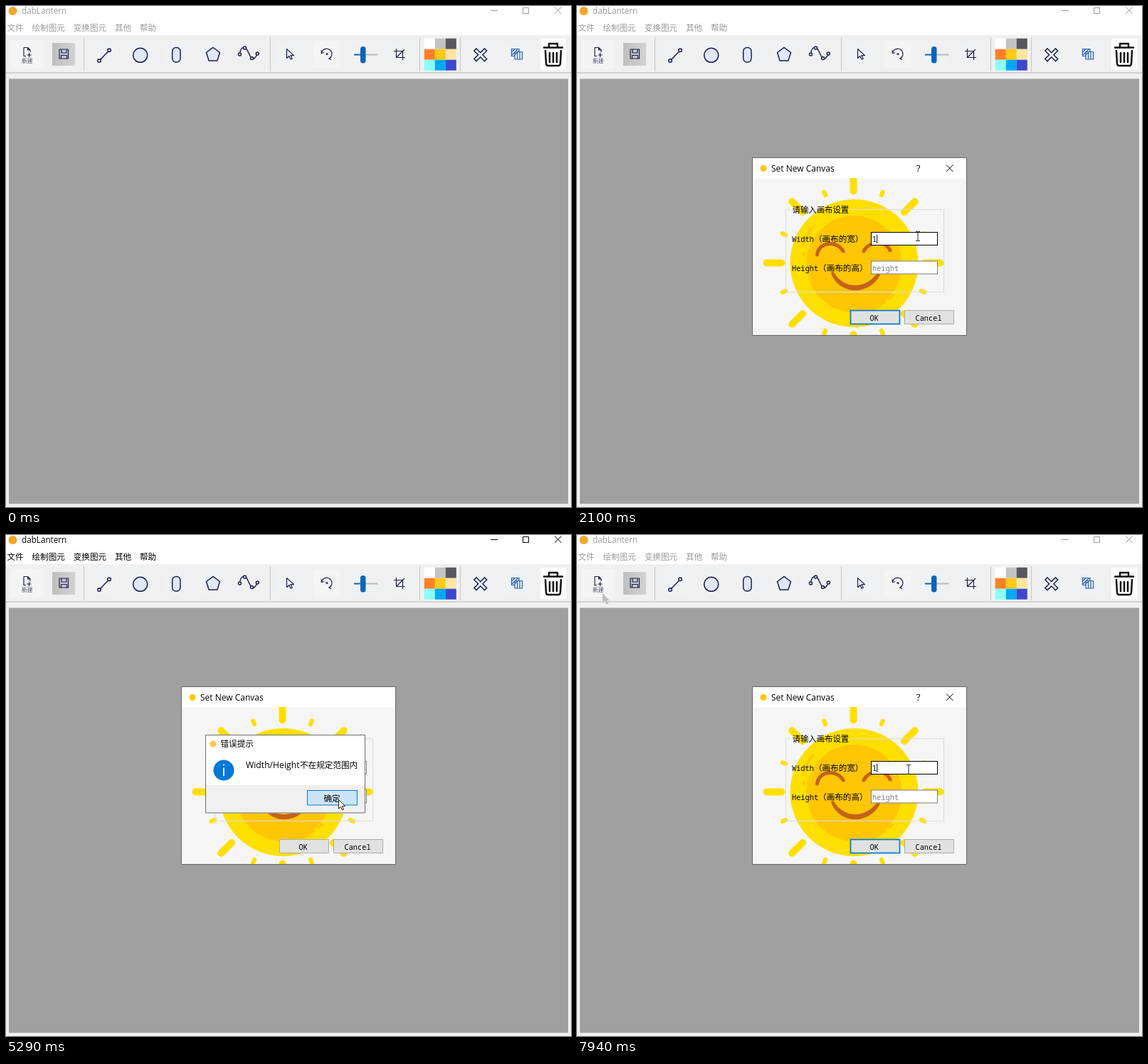
These frames come from a looping animation (794x705 px, 8 s). An HTML page:

```html
<!DOCTYPE html>
<html lang="zh">
<head>
<meta charset="utf-8">
<title>dabLantern</title>
<style>
html, body { margin: 0; width: 100%; height: 100%; overflow: hidden; background: #f0f0f0; }
svg { display: block; }
text { font: 11.7px 'Open Sans', 'Noto Sans CJK SC', 'Noto Sans CJK JP', sans-serif; white-space: pre; }
.mono { font: 10.3px 'Noto Sans Mono', 'Noto Sans CJK SC', 'Noto Sans CJK JP', monospace; }
.cjk { font: 11.6px 'Noto Sans CJK SC', 'Noto Sans CJK JP', sans-serif; }
.icon { fill: none; stroke: #1d1f52; stroke-width: 1.5; stroke-linejoin: round; }
.thin { stroke-width: 1.2; }
.pale { fill: #e1e8fb; }
.line { fill: none; stroke: currentColor; }
.fill { fill: currentColor; }
.round { fill: none; stroke-linecap: round; stroke-linejoin: round; }
</style>
</head>
<body>
<svg width="794" height="705" viewBox="0 0 794 705">
  <defs>
    <linearGradient id="steel"><stop stop-color="#bfbfbf"/><stop offset="1" stop-color="#d2d2d2"/></linearGradient>
    <clipPath id="inside"><path d="M247 242h300v221h-300z"/></clipPath>
  </defs>

  <!-- main window -->
  <path fill="#fff" d="M0 0h794v41H0z"/>
  <path fill="#a0a0a0" d="M4 102.5h786v598H4z"/>
  <path class="line" color="#b4b4b4" d="M0 94h794"/>
  <path class="line" color="#c6c6c6" d="M109.5 44v48M371.5 44v48M581.5 44v48M638.5 44v48"/>
  <circle cx="9.5" cy="7" r="6" fill="#f3a52c"/>
  <g id="chrome">
    <text class="fill" x="22" y="11">dabLantern</text>
    <g class="fill" id="menu"></g>
    <path class="line" d="M681 6.500h10M726.500 2.500h8v8h-8zM771 1.500l9.500 9.500M780.500 1.500l-9.500 9.500"/>
  </g>

  <!-- toolbar -->
  <g id="tiles" fill="#eff1f3"></g>
  <path fill="#f4f4f4" d="M7 48h46v40H7zM432 49h38v38h-38z"/>
  <path fill="url(#steel)" d="M65 52h32v32H65z"/>
  <path fill="#fff" d="M751 46h36v44h-36z"/>
  <g class="icon">
    <path class="thin" d="M28 70.500h-3v-12h5.500l3.500 3.500v3M30.500 58.500v3.500h3.500M32.500 66v6M29.500 69h6"/>
    <path class="thin" d="M75 61h12.500v13H75zM78 61v5h7v-5M77.500 74v-4.500h8V74"/>
    <path d="M132.500 75.500l11-11.500"/>
    <circle class="pale" cx="131" cy="77" r="2.300"/><circle class="pale" cx="145" cy="62.300" r="2.300"/>
    <circle class="pale" cx="188.700" cy="69.300" r="10"/>
    <rect class="pale" x="233.700" y="58.500" width="11.300" height="20.500" rx="5"/>
    <path class="pale" d="M291 58.300l9.500 7.200-3.600 11.500h-11.800l-3.600-11.500z"/>
    <path d="M328.500 67C330 57 336 55 340 64S347 80 353 68"/>
    <circle class="pale" cx="328.500" cy="68" r="2"/><circle class="pale" cx="335.500" cy="59" r="2"/>
    <circle class="pale" cx="345.500" cy="73.500" r="2"/><circle class="pale" cx="353.300" cy="67" r="2"/>
    <path class="thin" d="M394.500 60.500v13l3.300-3 2.400 4.700 2-1-2.300-4.600h4.600z"/>
    <path class="thin" d="M443.500 66a7.300 7.300 0 1 1 10.500 8M443 62.500l.5 4 3.700-1M456.500 71.500l-2.700 2.600 3.300 1.400"/>
    <circle class="thin" cx="451" cy="67.500" r="1"/>
    <path class="thin" d="M548.500 60v12.500H561M545 63.500h12.500V76M548.500 72.500L560 61"/>
  </g>
  <text x="22" y="80" fill="#44466c" style="font-size:7.700px">新建</text>
  <path stroke="#b8b8b8" stroke-width="2" d="M505 68.500h17.500"/>
  <path stroke="#0a65b7" stroke-width="2" d="M489 68.500h10"/>
  <rect x="498" y="57" width="7.500" height="23.500" rx="3.500" fill="#0a65b7"/>
  <g id="palette"></g>
  <g fill="none" stroke-linecap="square">
    <path stroke="#1d1f52" stroke-width="6" d="M661 63l11.500 11.500M672.500 63L661 74.500"/>
    <path stroke="#eef2fc" stroke-width="3" d="M661 63l11.500 11.500M672.500 63L661 74.500"/>
  </g>
  <path class="line thin" color="#2460b4" d="M715 70.500h-4.500v-10h10.500v4M710.500 65l4.500-4.500M710.500 69.500l9-9M714 69.500l6.500-6M715 64.500h10.500V75H715zM718.500 64.500V75M722 64.500V75"/>
  <path class="round" stroke="#111" stroke-width="2.500" d="M756 58.500h26M763 58v-5h12v5M758 63l1 18q.2 3 3 3h14q2.800 0 3-3l1-18M764 66v13M769 66v13M774 66v13"/>

  <!-- canvas size dialog -->
  <g id="dialog">
    <path fill="#f5f5f5" d="M247 214h300v250H247z"/>
    <path fill="#fff" d="M247 214h300v28.500H247z"/>
    <circle cx="262" cy="228.500" r="4.500" fill="#ffc605"/>
    <text id="caption" x="273" y="232.500" style="font-size:12px">Set New Canvas</text>
    <g id="buttons">
      <text class="fill" x="477" y="232.500" style="font-size:12.500px">?</text>
      <path class="line" d="M519 223.500l9.500 9.500M528.500 223.500l-9.500 9.500"/>
    </g>
    <g clip-path="url(#inside)">
      <g id="rays" class="round" stroke="#ffdf00" transform="translate(388.500 361.500)"></g>
      <circle cx="389.500" cy="362" r="90" fill="#ffdf00"/>
      <ellipse cx="389.500" cy="363" rx="67" ry="68" fill="#ffc605"/>
      <path class="round" stroke="#ffc605" stroke-width="3" d="M318 338q4-16 14-29M319 347l-1 4M415 427q10-4 18-11M439 412l5-5"/>
      <path class="round" stroke="#c4621a" stroke-width="5" d="M337.500 350c2-18 27-21 36.500-5M403 345c8-15 31-15 37-1"/>
      <path fill="#c4621a" d="M357 376q1-4 4-1c14 24 44 24 61 1 3-3 5-1 4 2-15 30-57 30-69-2z"/>
    </g>
    <path class="line" color="#dcdcdc" d="M300 286.500h-6.500v116h222v-116H385"/>
    <text class="cjk" x="302.500" y="290.500" style="font-size:11.400px">请输入画布设置</text>
    <g id="fields"></g>
    <path id="caret" stroke="#000" d="M0 0v12"/>
    <rect id="ok" x="384.500" y="428.500" width="69" height="19" fill="#e1e1e1"/>
    <text class="mono" x="411.500" y="442.500">OK</text>
    <rect x="460.500" y="428.500" width="69" height="19" fill="#e1e1e1" stroke="#adadad"/>
    <text class="mono" x="475.500" y="442.500">Cancel</text>
    <path class="line" color="#666" d="M246.500 213.500h301v250h-301z"/>
  </g>

  <!-- error message -->
  <g id="message">
    <path fill="#fff" d="M280.500 281.500h224v110h-224z"/>
    <path fill="#f0f0f0" d="M281 352h223v39H281z"/>
    <path class="line" color="#6c6c6c" d="M280.500 281.500h224v109.500h-224z"/>
    <circle cx="291" cy="294" r="4.500" fill="#ffc84a"/>
    <text class="cjk" x="301.500" y="298">错误提示</text>
    <path id="closeMark" class="line" d="M484 289.500l9 9M493 289.500l-9 9"/>
    <circle cx="306" cy="331" r="14.500" fill="#0078d7"/>
    <path stroke="#fff" stroke-width="1.700" d="M306 327.500V339M306 322.500v2"/>
    <text x="337" y="328" style="font-size:12.200px">Width/Height</text>
    <text class="cjk" x="413" y="328">不在规定范围内</text>
    <path fill="#cce4f7" stroke="#0078d7" d="M423.500 359.500h70v20.500h-70z"/>
    <text class="cjk" x="446.500" y="374.500">确定</text>
  </g>

  <path id="trace" transform="translate(36 82)" fill="#bebebe" d="M0 0v13l3-2.500 2 4.500h3l-2-5h3.500z"/>
  <path id="arrow" fill="#fff" stroke="#222" d="M.5.5V13l3-2.700 2 4.700 2-.9-2-4.600h4z"/>
  <path id="beam" fill="none" stroke="#222" d="M-3-6.500h2q1 0 1 1v11q0 1-1 1h-2M3-6.500H1q-1 0-1 1M3 6.500H1q-1 0-1-1"/>
</svg>
<script>
const $ = id => document.getElementById(id);
const fill = (id, items, part) => { $(id).innerHTML = items.map(part).join(''); };
const set = (id, attrs) => { for (const k in attrs) $(id).setAttribute(k, attrs[k]); };
const show = (id, on) => set(id, { visibility: on ? 'inherit' : 'hidden' });
const ramp = (t, a, b) => Math.min(1, Math.max(0, (t - a) / (b - a)));
const within = (t, a, b) => t >= a && t < b;
const range = n => [...Array(n).keys()];

// menu entries follow each other with an even gap
let menuX = 1.5;
fill('menu', ['文件', '绘制图元', '变换图元', '其他', '帮助'], s => {
  const x = menuX;
  menuX += s.length * 11.6 + 11.8;
  return `<text class="cjk" x="${x}" y="35">${s}</text>`;
});
fill('tiles', [138, 399, 667], x => range(x < 600 ? 4 : 2)
  .map(i => `<rect x="${x - 19 + i * 51.3}" y="50" width="38" height="36"/>`).join(''));
fill('palette', ['fff', 'c3c3c3', '57585c', 'ff7f27', 'ffca18', 'fde6a2', '8cfffb', '00a8f3', '3f48cc'], (c, i) =>
  `<rect x="${587.8 + i % 3 * 15}" y="${45.7 + (i / 3 | 0) * 15}" width="15" height="15" fill="#${c}"/>`);
// sixteen rays, long and short by turns
fill('rays', range(16), i => i % 2
  ? `<path d="M103 0h5" stroke-width="6" transform="rotate(${i * 22.5})"/>`
  : `<path d="M101 0h21" stroke-width="10" transform="rotate(${i * 22.5})"/>`);
fill('fields', [['Width', '宽'], ['Height', '高']], ([name, sign], i) => `<g transform="translate(0 ${i * 40.5})">
  <text class="mono" x="302" y="332">${name}<tspan class="cjk">（画布的${sign}）</tspan></text>
  <rect id="frame${name}" x="413.5" y="318.5" width="93" height="18" fill="#fff"/>
  <text class="mono" id="value${name}" x="415" y="332"></text></g>`);

const spots = {
  entry: [740, 685], create: [36, 82], dialog: [494, 333], width: [479, 324], height: [469, 372],
  ok: [420, 437], confirm: [467, 372], below: [500, 476], widthAgain: [466, 330]
};
// pointer moves: begin, end, goal
const moves = [
  [70, 860, 'create'], [1000, 1150, 'dialog'], [1240, 1790, 'width'], [3260, 3730, 'height'], [4520, 4660, 'ok'],
  [4740, 4920, 'confirm'], [5320, 5520, 'create'], [6180, 6560, 'below'], [6600, 7320, 'widthAgain']
];

function pointer(t) {
  return moves.reduce((from, [a, b, goal]) => {
    const f = ramp(t, a, b), ease = f * f * (3 - 2 * f);
    return from.map((v, i) => v + (spots[goal][i] - v) * ease);
  }, spots.entry);
}

// windows fade while growing slightly around their centre
function fade(id, amount, cx, cy) {
  const s = .95 + .05 * amount;
  set(id, { opacity: amount, transform: `translate(${cx} ${cy}) scale(${s}) translate(${-cx} ${-cy})` });
}

const typed = (text, t, start, gap) => text.slice(0, Math.max(0, Math.floor((t - start) / gap) + 1));

function field(name, value, focused) {
  $('value' + name).textContent = value || name.toLowerCase();
  set('value' + name, { fill: value ? '#000' : '#808080' });
  set('frame' + name, { stroke: focused ? '#000' : '#7a7a7a' });
}

function draw(t) {
  const again = t > 6000;
  const open = again ? ramp(t, 6150, 6310) : ramp(t, 1040, 1202) - ramp(t, 5310, 5440);
  const warn = ramp(t, 4720, 4840) - ramp(t, 5300, 5400);
  const blocked = within(t, 4720, 5210), closing = within(t, 5210, 6000);
  fade('dialog', open, 397, 339);
  fade('message', warn, 392.5, 336);
  set('chrome', { color: within(t, 920, 1040) || within(t, 5210, 6130) ? '#000' : '#999' });
  set('caption', { fill: blocked ? '#999' : '#000' });
  set('buttons', { color: blocked ? '#999' : '#000' });
  show('buttons', !closing);
  show('closeMark', !closing);

  const width = again ? typed('1', t, 7940, 140) : typed('10000', t, 2100, 137);
  const height = again ? '' : typed('100', t, 3900, 190);
  const onWidth = within(t, 1560, 3500) || t >= 7250, onHeight = within(t, 3500, 4680);
  field('Width', width, onWidth);
  field('Height', height, onHeight);
  show('caret', (onWidth || onHeight) && !within(t, 7790, 7940));
  set('caret', { transform: `translate(${415.5 + 6.18 * (onHeight ? height : width).length} ${onHeight ? 362 : 322})` });
  const idle = blocked || closing;
  set('ok', { stroke: idle ? '#adadad' : '#0078d7', 'stroke-width': idle ? 1 : 1.7 });

  const [x, y] = pointer(t);
  const inField = open > .5 && warn <= 0 && !closing && within(x, 413, 507) && (within(y, 318, 337) || within(y, 359, 378));
  for (const id of ['arrow', 'beam']) set(id, { transform: `translate(${x} ${y})` });
  show('arrow', t >= 70 && !inField);
  show('beam', inField);
  show('trace', t > 6250);
}

function tick() {
  draw(performance.now() % 8000);
  requestAnimationFrame(tick);
}
tick();
</script>
</body>
</html>
```
